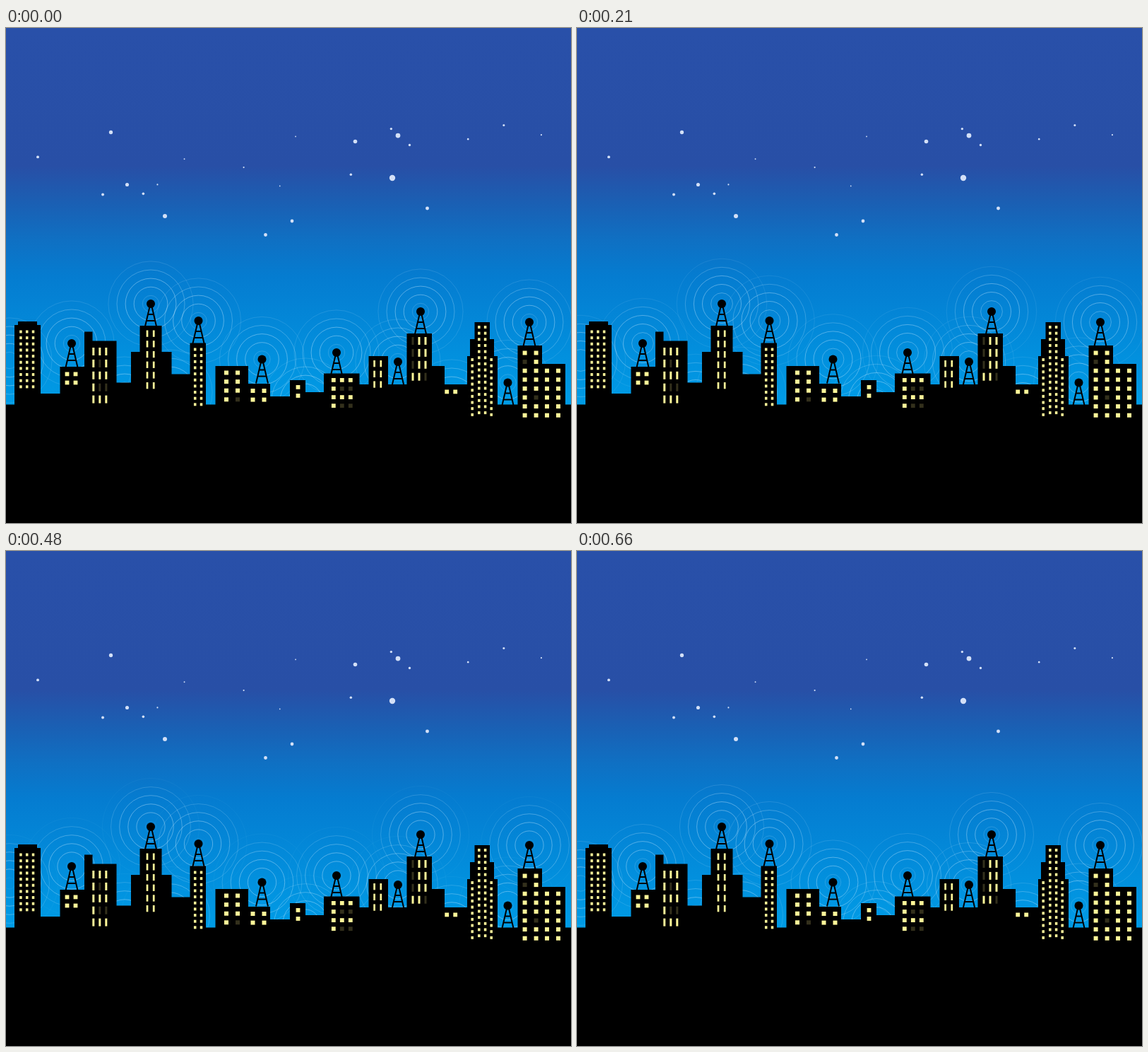
Write an HTML page with a canvas that moves like this. It is 800 px wide and 700 px high and loops after 0.69 s.

```html
<!DOCTYPE html>
<html lang="en">
<head>
<meta charset="utf-8">
<title>City signals</title>
<style>
  html, body { margin: 0; width: 100%; height: 100%; overflow: hidden; background: #000; }
  canvas { display: block; width: 800px; height: 700px; }
</style>
</head>
<body>
<canvas id="stage" width="800" height="700"></canvas>
<script>
const W = 800, H = 700, GROUND = 532.5;
const STEP = 30, STEPS = 23;
const GAP = 12.1, FADE = 72;
const ctx = document.getElementById('stage').getContext('2d');

const sky = { 0: '#2950a9', 195: '#284fa6', 250: '#1a60b4', 300: '#0f70c3', 350: '#057cd0', 533: '#009ce6' };

// brightest first
const brightStars = [[547, 212], [555, 152], [225, 266], [494.5, 160.5], [148.5, 147.5],
  [171.5, 221.5], [596.5, 255], [367.5, 292.5], [405, 273]];

const skyline = new Path2D(`M0 700V${GROUND}H12V420H17V415H44V420H49V517H76.5V479H111V429.5H122.5
  V442.5H156.5V501.5H177V458H189.5V421H220.5V458H234.5V489.5H260.5V445.5H283V${GROUND}
  H296.5V478H343V503H374V521H402V498H424V515H450V488.5H500.5V504H513.5V464H541V504
  H567.5V432H603V478H621V504H653V464H657V440H663.5V416H685V440H691V464H696V${GROUND}
  H724.5V449H759V475H792V${GROUND}H800V700Z`);

const masts = [[93, 446], [205, 390], [272.5, 414], [362.5, 468.5], [468, 459],
  [555, 472], [587, 401], [710.5, 501.5], [741, 416]];
const hidden = [[5, 470], [168, 525], [232, 515], [424, 527], [631, 529]];
const sources = [...masts, ...hidden];

// window size and pitch
const dot = { w: 3.5, h: 4, dx: 8.8, dy: 8.65 };
const slit = { w: 2.7, h: 9.3, dx: 9.2, dy: 14.7 };
const tall = { w: 3, h: 11, dx: 9, dy: 16.9 };
const pane = { w: 5.8, h: 5.8, dx: 12, dy: 12.1 };
const wide = { w: 6, h: 6, dx: 16, dy: 12.6 };

// style, centre x, top, columns, rows, unlit cells counted down the columns
const facades = [
  [dot, 29.7, 427.5, 3, 10],
  [pane, 92.5, 486.5, 2, 2],
  [tall, 132.8, 452, 3, 5, [6, 8, 13]],
  [slit, 204.6, 427.5, 2, 6],
  [dot, 272.1, 452.5, 2, 10],
  [wide, 320, 484.5, 2, 4, [7]],
  [wide, 357.5, 510, 2, 2],
  [pane, 413.5, 505, 1, 2],
  [pane, 475.8, 495, 3, 4, [5, 7, 9, 11]],
  [slit, 526.2, 470, 2, 3],
  [tall, 585, 437, 3, 4, [0, 1, 2, 11]],
  [pane, 630.2, 511.5, 2, 1],
  [dot, 674.2, 421, 2, 15],
  [dot, 660.2, 467, 1, 10],
  [dot, 687.2, 467, 1, 10],
  [wide, 742.6, 456.5, 2, 8, [1, 13]],
  [wide, 774, 481.7, 2, 6]
];

function seeded(seed) {
  return () => (seed = seed * 16807 % 2147483647) / 2147483647;
}

function disc(c, x, y, r) {
  c.beginPath();
  c.arc(x, y, r, 0, 2 * Math.PI);
  c.fill();
}

function layer(draw) {
  const cv = document.createElement('canvas');
  cv.width = W;
  cv.height = H;
  draw(cv.getContext('2d'));
  return cv;
}

function drawMast(c, x, y) {
  disc(c, x, y, 6);
  c.beginPath();
  for (const side of [-1, 1]) {
    c.moveTo(x + side * 1.5, y + 4);
    c.lineTo(x + side * 8.5, y + 34);
  }
  for (const dy of [15, 24]) {
    const half = dy / 4;
    c.moveTo(x - half, y + dy);
    c.lineTo(x + half, y + dy);
  }
  c.stroke();
}

function drawFacade(c, { w, h, dx, dy }, x, top, cols, rows, unlit = []) {
  const left = x - ((cols - 1) * dx + w) / 2;
  for (let n = 0; n < cols * rows; n++) {
    c.fillStyle = unlit.includes(n) ? '#33301c' : '#fff799';
    c.fillRect(left + Math.floor(n / rows) * dx, top + n % rows * dy, w, h);
  }
}

const backdrop = layer(c => {
  const g = c.createLinearGradient(0, 0, 0, 533);
  for (const y in sky) g.addColorStop(y / 533, sky[y]);
  c.fillStyle = g;
  c.fillRect(0, 0, W, H);
  c.fillStyle = '#d3e0f7';
  brightStars.forEach(([x, y], i) => disc(c, x, y, 2 + 2.2 / (1 + i * 0.6)));
  const rnd = seeded(41);
  for (let i = 0; i < 14; i++) {
    disc(c, 45 + 51 * (i + rnd()), 136 + 118 * rnd(), 0.7 + 1.3 * rnd());
  }
});

const city = layer(c => {
  c.fill(skyline);
  c.lineWidth = 2;
  masts.forEach(m => drawMast(c, ...m));
  facades.forEach(f => drawFacade(c, ...f));
});

function drawRings(phase) {
  for (let k = 0; k < 6; k++) {
    const r = GAP * (k + phase) - 0.4;
    if (r < 6 || r >= FADE) continue;
    const alpha = 0.4 * Math.min(1, (r - 6) / 12, (FADE - r) / 34);
    ctx.strokeStyle = `rgba(205,235,255,${alpha})`;
    for (const [x, y] of sources) {
      ctx.beginPath();
      ctx.arc(x, y, r, 0, 2 * Math.PI);
      ctx.stroke();
    }
  }
}

const start = performance.now();
function render(now) {
  const step = Math.floor(Math.max(0, now - start) / STEP) % STEPS;
  ctx.drawImage(backdrop, 0, 0);
  drawRings(step / STEPS);
  ctx.drawImage(city, 0, 0);
  requestAnimationFrame(render);
}
render(start);
</script>
</body>
</html>
```
